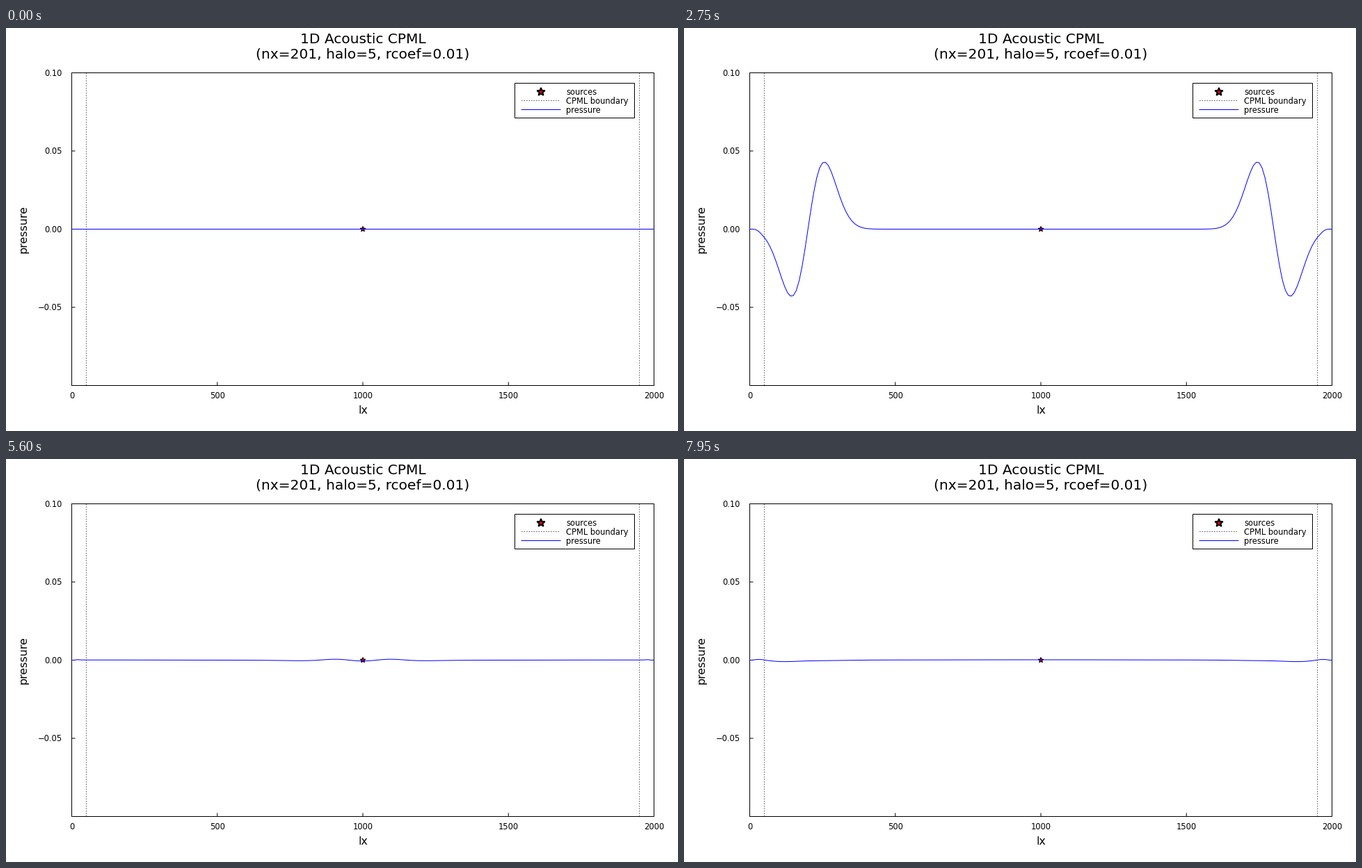
Recreate the animation shown at these times as a matplotlib script. Size 966 by 580 pixels, loop 8000 ms.

```python
import numpy as np
import matplotlib.pyplot as plt
from matplotlib.animation import FuncAnimation
from matplotlib.patches import Polygon, Rectangle

W, H, DPI = 966, 580, 100
LEFT, RIGHT, TOP, BOTTOM = 94.5, 931.5, 64.5, 514.5
FRAMES, INTERVAL = 160, 50
PX = 72 / DPI  # points per pixel

LX, HALO = 2000, 50
STEP, DELAY = 20, 300  # metres travelled per frame, source delay in metres
SIGMA, PEAK = 250 / (np.sqrt(2) * np.pi), 0.043

plt.rcParams["font.family"] = "DejaVu Sans"
plt.rcParams["path.simplify"] = False
plt.rcParams["path.snap"] = False  # coordinates already sit on pixel centres

x = np.linspace(0, LX, 201)


def to_px(v):
    return LEFT + np.asarray(v) * (RIGHT - LEFT) / LX


def to_py(p):
    return (TOP + BOTTOM) / 2 - np.asarray(p) * (BOTTOM - TOP) / 0.2


def bell(q, centre, width):
    return np.exp(-((q - centre) / width) ** 2 / 2)


def direct(u):
    """Integrated Ricker pulse, negative side leading."""
    a = u / SIGMA
    return -PEAK * a * np.exp((1 - a * a) / 2)


def echo(q):
    """Weak wave sent back by an absorbing layer, with its long tail."""
    tail = 0.00012 / (1 + np.exp(np.clip((q + 600) / 80, -50, 50)))
    return (0.0016 * bell(q, 141, 50) - 0.00085 * bell(q, 14, 52)
            - 0.00045 * bell(q, -100, 100) + tail)


def residue(k):
    """Pressure lingering inside the layer after the pulse has gone."""
    n = k - 71
    rise = 1 / (1 + np.exp(-(k - 64) / 1.5))
    return rise * (0.003 * np.exp(-n / 8) + 0.0018 * np.exp(-n / 22))


edge = np.minimum(x, LX - x)
ramp = np.clip((edge - 5) / 40, 0, 1)
taper = ramp * ramp * (3 - 2 * ramp)
bump = np.interp(edge, np.arange(0, 70, 10), [0, 0.1, 1, 0.4, 0.12, 0.03, 0])


def pressure(k):
    d = STEP * k - DELAY
    back = d - LX / 2
    p = direct(np.abs(x - LX / 2) - d)
    p = p + echo(x - back) + echo(LX - x - back)
    return p * taper + bump * residue(k)


fig = plt.figure(figsize=(W / DPI, H / DPI), dpi=DPI, facecolor="white")
ax = fig.add_axes([0, 0, 1, 1])
ax.set_xlim(0, W)
ax.set_ylim(H, 0)
ax.axis("off")


def line(xs, ys, color="black", **kw):
    return ax.plot(xs, ys, color=color, lw=PX, snap=False, **kw)[0]


def dotted(xs, ys, zorder):
    line(xs, ys, color="#5a5a5a", ls=(0, (1.6, 1.9)),
         dash_capstyle="butt", zorder=zorder)


def box(x0, y0, x1, y1, zorder, fill="none"):
    ax.add_patch(Rectangle((x0, y0), x1 - x0, y1 - y0, fc=fill, ec="black",
                           lw=PX, snap=False, zorder=zorder))


def star(cx, cy, radius, width, zorder):
    angle = np.arange(10) * np.pi / 5
    r = np.where(np.arange(10) % 2 == 0, radius, 0.42 * radius)
    pts = np.column_stack([cx + r * np.sin(angle), cy - r * np.cos(angle)])
    ax.add_patch(Polygon(pts, fc="red", ec="black", lw=width * PX,
                         joinstyle="miter", zorder=zorder))


def text(tx, ty, s, size, ha="center", **kw):
    ax.text(tx, ty, s, fontsize=size * PX, ha=ha, va="baseline",
            color="black", zorder=8, **kw)


TITLE, LABEL, SMALL = 20.2, 15.9, 11.55
mid = (LEFT + RIGHT) / 2

text(mid, 22, "1D Acoustic CPML", TITLE)
text(mid, 44, "(nx=201, halo=5, rcoef=0.01)", TITLE)
text(mid, 555, "lx", LABEL)
text(29, 289.5, "pressure", LABEL, rotation=90, rotation_mode="anchor")

# axes frame and ticks
box(LEFT, TOP, RIGHT, BOTTOM, 3)
for v in range(0, 2001, 500):
    line([to_px(v)] * 2, [BOTTOM, BOTTOM - 4.5], zorder=3)
    text(to_px(v), 532.7, str(v), SMALL)
for v in (0.10, 0.05, 0.0, -0.05):
    y = to_py(v)
    line([LEFT, LEFT + 4.5], [y, y], zorder=3)
    text(81, y + 4.2, f"{v:.2f}".replace("-", "\u2212"), SMALL, ha="right")

for v in (HALO, LX - HALO):
    dotted([to_px(v)] * 2, [BOTTOM, TOP], 2)
star(to_px(LX / 2), to_py(0), 4, 1.1, 4)
wave = line(to_px(x), to_py(pressure(0)), color="blue", zorder=5,
            solid_joinstyle="round", solid_capstyle="butt")

# legend
box(731.5, 79.5, 903.5, 129.5, 6, "white")
star(769, 92, 6, 2, 7)
dotted([741, 797], [104.5, 104.5], 7)
line([741, 797], [117.5, 117.5], color="blue", zorder=7)
for y, name in ((96.4, "sources"), (109, "CPML boundary"), (121.6, "pressure")):
    text(805, y, name, SMALL, ha="left")


def update(k):
    wave.set_ydata(to_py(pressure(k)))
    return (wave,)


anim = FuncAnimation(fig, update, frames=FRAMES, interval=INTERVAL,
                     repeat=True, repeat_delay=0, blit=False)
plt.show()
```
